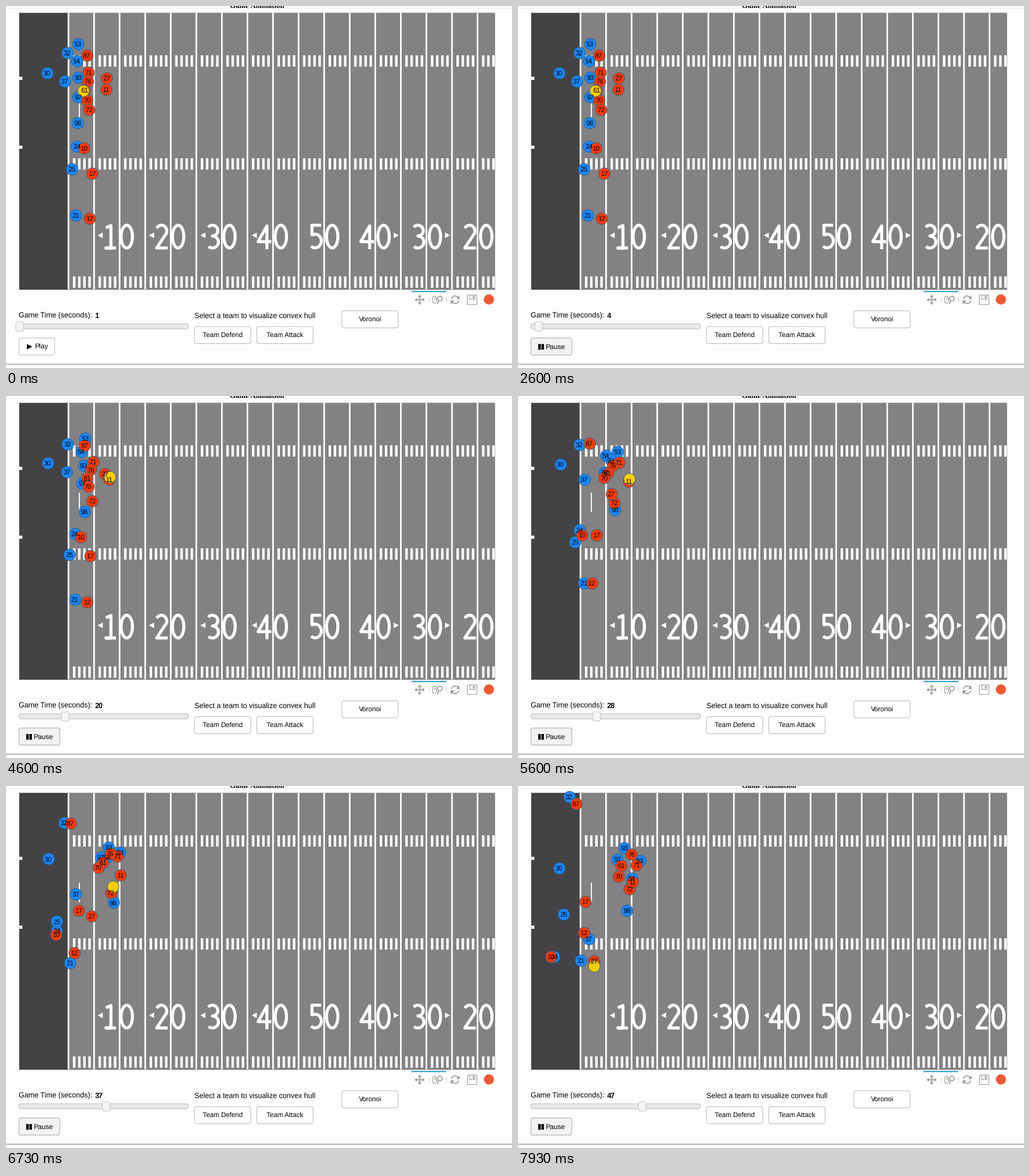
Animation of 800x573 px, one loop 8 s. Source, as a matplotlib script:

```python
import numpy as np
import matplotlib.pyplot as plt
from matplotlib.animation import FuncAnimation
from matplotlib.collections import LineCollection
from matplotlib.patches import Arc, Circle, FancyBboxPatch, Polygon, Rectangle

plt.rcParams["text.hinting"] = "none"

W, H, DPI = 800, 573, 64
PX = 72 / DPI                      # points per pixel
FRAMES, STEP = 160, 50             # 8000 ms
HOVER, CLICK, TICK = 1500, 2195, 123

BLUE, RED, GOLD = "#1c87ff", "#ff3b08", "#ffcc00"
EDGE, GRAY, DARK, ICON = "#1f5f86", "#838183", "#444245", "#9b9b9b"
BORDER, PRESSED = "#bdbdbd", "#f3f2f3"

fig = plt.figure(figsize=(W / DPI, H / DPI), dpi=DPI, facecolor="#fefdfe")
ax = fig.add_axes([0, 0, 1, 1])
ax.set_xlim(0, W)
ax.set_ylim(H, 0)
ax.axis("off")


def box(x, y, w, h, color, z=1):
    return ax.add_patch(Rectangle((x, y), w, h, fc=color, ec="none", zorder=z))


def rounded(x, y, w, h, face="white", edge=BORDER, r=3, z=1):
    style = f"round,pad=0,rounding_size={r}"
    return ax.add_patch(FancyBboxPatch((x, y), w, h, boxstyle=style, fc=face,
                                       ec=edge, lw=PX, zorder=z))


def text(x, y, s, size=10.6, family="Liberation Sans", **kw):
    kw.setdefault("zorder", 3)
    return ax.text(x, y, s, fontsize=size * PX, family=family,
                   color="black", va="baseline", **kw)


def lines(segments, color, width, z=2, snap=None):
    ax.add_collection(LineCollection(segments, colors=color, snap=snap,
                                     linewidths=width * PX, zorder=z))


def triangle(points, color, z=2):
    return ax.add_patch(Polygon(points, fc=color, ec="none", zorder=z))


# ---- field ----------------------------------------------------------------
LEFT, TOP, RIGHT, BOTTOM = 21, 11, 772.5, 448.5
GOAL, GAP = 98.8, 40.42

box(LEFT - 1, TOP - 1, RIGHT - LEFT + 2, BOTTOM - TOP + 2, "#dedede", 0)
box(LEFT, TOP, RIGHT - LEFT, BOTTOM - TOP, GRAY, 0.5)
box(LEFT, TOP, GOAL - LEFT, BOTTOM - TOP, DARK, 0.6)
yards = GOAL + GAP * np.arange(17)
lines([[(x, TOP), (x, BOTTOM)] for x in yards], "white", 2.6, 1, False)

hashes = (yards[:, None] + 9 + 8.1 * np.arange(4)).ravel()
lines([[(x, y), (x, y + 18)] for x in hashes if x < RIGHT
       for y in (78, 241, 428)], "#fafafa", 4, 1, False)
lines([[(116, 153), (116, 184)]], "#eeeeee", 2, 1)
for y in (111.5, 220.5):
    box(LEFT, y, 4.5, 5, "white")


def arc(x, y, rx, ry, start, stop):
    a = np.radians(np.linspace(start, stop, 40))
    return [*zip(x + rx * np.cos(a), y + ry * np.sin(a))]


DIGITS = {
    "0": arc(0, 0, 9, 18, 0, 360),
    "1": [(-7, -14), (1, -17.5), (1, 18), (-7, 18), (9, 18)],
    "2": arc(-0.5, -8.5, 8.5, 9.5, -150, 20) + [(-8, 18), (9.5, 18)],
    "3": arc(-1, -9.5, 8.5, 8.5, -140, 90) + arc(-1, 8.5, 9.5, 9.5, -90, 130),
    "4": [(4, 20), (4, -17), (-10, 8), (11, 8)],
    "5": [(8.5, -18), (-6, -18), (-6, -3)] + arc(-1, 7, 9.8, 10.8, -110, 130),
}

strokes = []
for i, tens in enumerate("12345432"):
    x = GOAL + 2 * GAP - 1.7 + 81.2 * i
    for digit, dx in ((tens, -13), ("0", 13)):
        strokes.append(np.array(DIGITS[digit]) + (x + dx, 365))
    if i not in (4, 7):
        side = -1 if i < 4 else 1
        base = x + 2 + 27 * side
        triangle([(base, 358.5), (base, 367.5), (base + 8 * side, 363)], "white", 1)
lines(strokes, "white", 4.8, 1)

# ---- page and toolbar -----------------------------------------------------
box(0, 3, W, 1, "#ececec", 0)
text(396.5, 3, "Game Animation", 11.8, "Liberation Serif", weight="bold", ha="center")
box(0, 566, W, 1.5, "#b9b9b9")

box(641, 450.5, 54.5, 2, "#35a8dc")
lines([[(x, 461), (x, 469)] for x in (668.5, 695.5)], "#cfcfcf", 1)

lines([[(648, 465), (660, 465)], [(654, 459), (654, 471)]], ICON, 1.6)
for dx, dy in ((1, 0), (-1, 0), (0, 1), (0, -1)):
    tip = np.array((654 + 8 * dx, 465 + 8 * dy))
    back, side = np.array((dx, dy)) * 3.5, np.array((dy, dx)) * 3.2
    triangle([tip, tip - back + side, tip - back - side], ICON)

rounded(674.5, 459.5, 6, 11, "none", ICON, 2.8, 2)
lines([[(677.5, 462), (677.5, 465)], [(683.5, 466), (682.5, 472)]], ICON, 1.5)
ax.add_patch(Circle((686, 463), 3.7, fc="none", ec=ICON, lw=1.5 * PX, zorder=2))

for start, s in ((190, 1), (10, -1)):
    ax.add_patch(Arc((710, 465), 12, 12, theta1=start, theta2=start + 130,
                     ec=ICON, lw=1.6 * PX, zorder=2))
    triangle([(710 + 7 * s, 465 - 7 * s), (710 + 7 * s, 465 - s),
              (710 + 1.5 * s, 465 - s)], ICON)

rounded(729.5, 457.5, 15, 15, "none", ICON, 0.5, 2)
rounded(733.5, 457.5, 8, 7, "none", ICON, 0.5, 2)
box(738, 459, 2, 4, ICON, 2)
ax.add_patch(Circle((763.5, 464.5), 8, fc="#ee5a36", ec="none", zorder=2))

# ---- controls -------------------------------------------------------------
text(20, 494, "Game Time (seconds):", 11.55)
clock = text(140.7, 494, "1", 11.55, weight="bold")
text(298, 494, "Select a team to visualize convex hull", 11.55)
for x, y, name in ((298, 507.5, "Team Defend"), (396.5, 507.5, "Team Attack"),
                   (531, 482.5, "Voronoi")):
    rounded(x, y, 89, 27)
    text(x + 44.5, y + 17.8, name, ha="center")

rounded(20.5, 503, 267.5, 8, "#e9e9e9")
handle = rounded(15.5, 500, 12, 14.5, "#f6f6f6", "#c6c6c6", z=3)

play_box = rounded(20.5, 525.5, 56.5, 27)
play = [play_box, text(45.5, 543, "Play", 11),
        triangle([(33, 535), (33, 543.5), (41.5, 539.2)], "black")]
pause = [rounded(20.5, 525.5, 64.5, 27, PRESSED, "#adadad"),
         text(43, 543, "Pause", 11),
         box(32, 535, 4, 8.5, "black", 2), box(37, 535, 4, 8.5, "black", 2)]

# ---- players --------------------------------------------------------------
KEYS = np.array([1, 14, 33, 47])
TICKS = np.arange(1, 49)


def run(*route):
    """Wait at the first point, then ease through the middle one to the last."""
    p = np.array(route[:1] + route, float)
    m = np.gradient(p, KEYS, axis=0)
    m[:2] = 0
    i = np.clip(np.searchsorted(KEYS, TICKS, "right") - 1, 0, 2)
    h = np.diff(KEYS)[i][:, None]
    u = np.minimum((TICKS - KEYS[i])[:, None] / h, 1)
    ease = u * u * (3 - 2 * u)
    return (p[i] + ease * (p[i + 1] - p[i])
            + h * u * (1 - u) * ((1 - u) * m[i] - u * m[i + 1]))


def ramp(start, stop):
    return np.clip((TICKS - start) / (stop - start), 0, 1)[:, None]


defend = {
    53: run((114, 60), (173, 99), (193, 118)),
    32: run((97, 74), (95, 70), (81, 17)),
    54: run((112, 87), (151, 102), (180, 146)),
    30: run((65, 106), (67, 111), (65, 130)),
    37: run((93, 119), (109, 149), (112, 242)),
    93: run((114, 113), (158, 98), (168, 98)),
    97: run((114, 144), (146, 114), (157, 116)),
    98: run((113, 185), (166, 181), (172, 197)),
    24: run((112, 222), (88, 217), (57, 270)),
    25: run((104, 258), (84, 220), (72, 203)),
    21: run((110, 331), (102, 284), (99, 276)),
}
attack = {
    87: run((128, 78), (106, 68), (92, 28)),
    71: run((130, 105), (171, 107), (187, 125)),
    76: run((129, 119), (159, 107), (179, 108)),
    61: run((124, 133), (149, 120), (163, 126)),
    70: run((128, 149), (141, 126), (159, 143)),
    72: run((131, 164), (161, 170), (176, 163)),
    27: run((159, 114), (141, 181), (120, 277)),
    11: run((158, 132), (180, 138), (181, 152)),
    10: run((123, 225), (89, 225), (52, 270)),
    17: run((136, 265), (119, 204), (106, 183)),
    12: run((132, 336), (111, 277), (104, 232)),
}

# the ball goes from the centre to the passer, then to the runner
passer, runner = attack[11] + (1, -4), attack[27] + (0, 8)
ball_track = np.array((122, 134)) + ramp(11, 18) * (passer - (122, 134))
ball_track += ramp(35, 42) * (runner - ball_track)


def dots(color, z):
    return ax.scatter([], [], s=(18.4 * PX) ** 2, c=color, edgecolors=EDGE,
                      linewidths=0.8 * PX, zorder=z, snap=False)


teams = [(defend, dots(BLUE, 4)), (attack, dots(RED, 5))]
ball = dots(GOLD, 6)
labels = {n: text(0, 0, str(n), 10.8, ha="center", zorder=7)
          for team, _ in teams for n in team}


def draw(frame):
    ms = frame * STEP
    now = max(0, (ms - CLICK) // TICK + 1) if ms >= CLICK else 0
    now = max(0, now - 1)
    for team, marks in teams:
        marks.set_offsets([track[now] for track in team.values()])
        for n, track in team.items():
            labels[n].set_position(track[now] + (0, 4))
    ball.set_offsets([ball_track[now]])
    clock.set_text(str(now + 1))
    handle.set_x(15.5 + 3.804 * now)

    running = ms >= CLICK
    play_box.set_facecolor(PRESSED if ms >= HOVER else "white")
    for part in play:
        part.set_visible(not running)
    for part in pause:
        part.set_visible(running)
    return []


anim = FuncAnimation(fig, draw, frames=FRAMES, init_func=lambda: draw(0),
                     interval=STEP, repeat=True, repeat_delay=0, blit=False)
plt.show()
```
